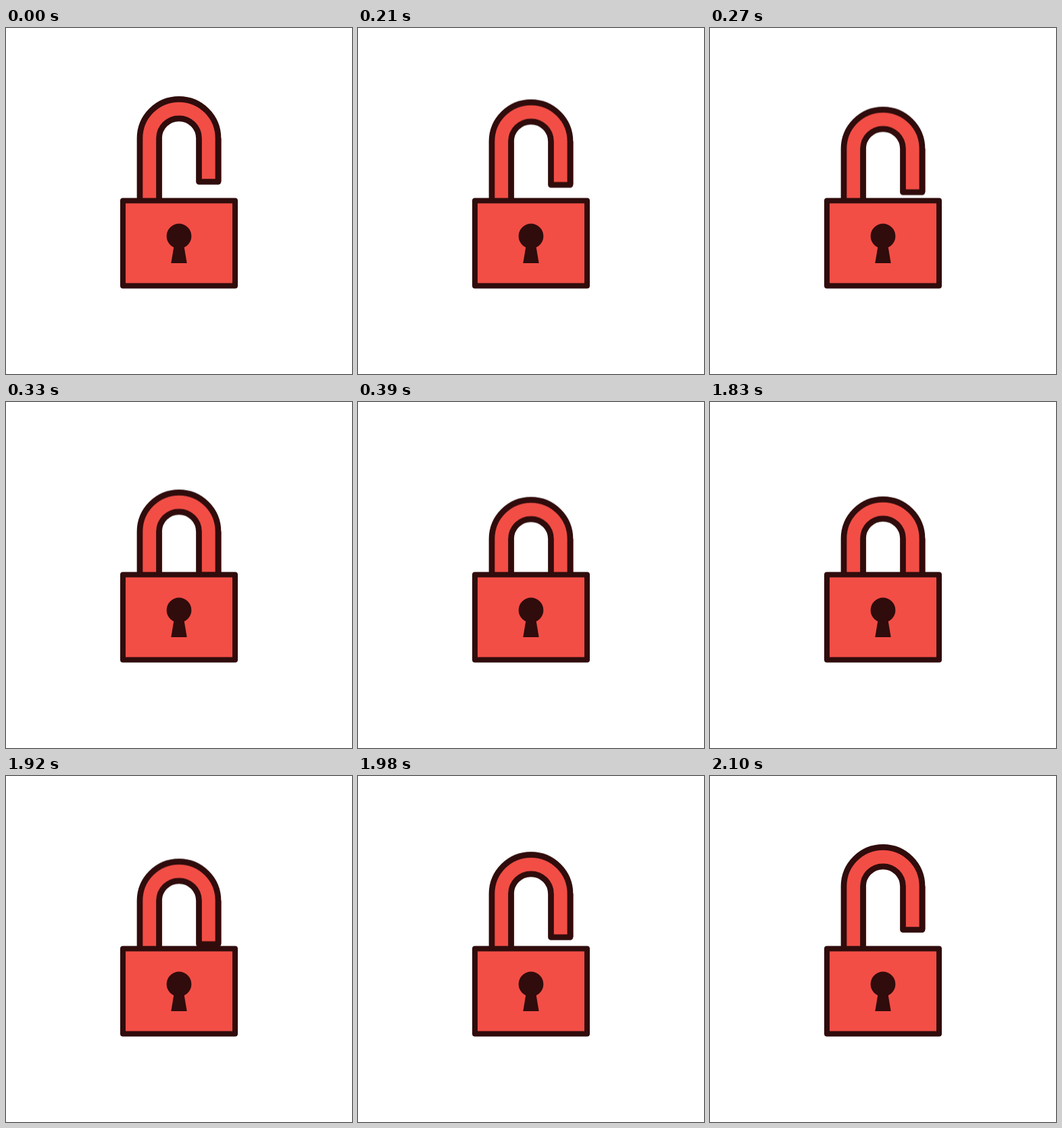
Recreate the animation shown at these times as an HTML page. Size 512 by 512 pixels, loop 2700 ms.

```html
<!DOCTYPE html>
<html lang="en">
<head>
<meta charset="utf-8">
<title>Padlock</title>
<style>
  html, body { margin: 0; width: 100%; height: 100%; overflow: hidden; background: #fff; }
  svg { display: block; width: 100vw; height: 100vh; }
  .metal { fill: #f24e46; stroke: #300c0c; stroke-linejoin: round; }
  .edge { fill: none; stroke: #f24e46; stroke-width: 1; }
  .hole { fill: #300c0c; }
</style>
</head>
<body>
<svg viewBox="0 0 512 512">
  <g id="shackle">
    <path class="edge" d="M230.6 163V290M318.3 163V227"/>
    <path class="metal" stroke-width="8.7" d="M198 290V163.3a58 58 0 0 1 116 0V227.5H285.5V163.3a29.5 29.5 0 0 0 -59 0V290Z"/>
  </g>
  <rect class="metal" stroke-width="8" x="173" y="255.4" width="166" height="126.2"/>
  <circle class="hole" cx="256" cy="308" r="18.4"/>
  <path class="hole" d="M249 320H263L267.7 348H244.3Z"/>
</svg>
<script>
  const LOOP = 2700, STEP = 30;
  const DROP = 44;

  // [time in ms, shackle offset, easing to the next key]
  const keys = [
    [0, 0, 'linear'],
    [150, 0, 'cubic-bezier(.333, 0, .667, 1)'],
    [450, DROP, 'linear'],
    [1800, DROP, 'cubic-bezier(.167, .167, .667, 1)'],
    [2100, 0, 'linear'],
    [LOOP, 0, 'linear']
  ];

  const slide = document.getElementById('shackle').animate(
    keys.map(([t, y, easing]) => ({ offset: t / LOOP, transform: `translateY(${y}px)`, easing })),
    { duration: LOOP, fill: 'both' }
  );
  slide.pause();

  const start = performance.now();

  // Motion advances in fixed ticks.
  function draw() {
    const t = (performance.now() - start) % LOOP;
    slide.currentTime = Math.floor(t / STEP) * STEP;
    requestAnimationFrame(draw);
  }
  draw();
</script>
</body>
</html>
```
